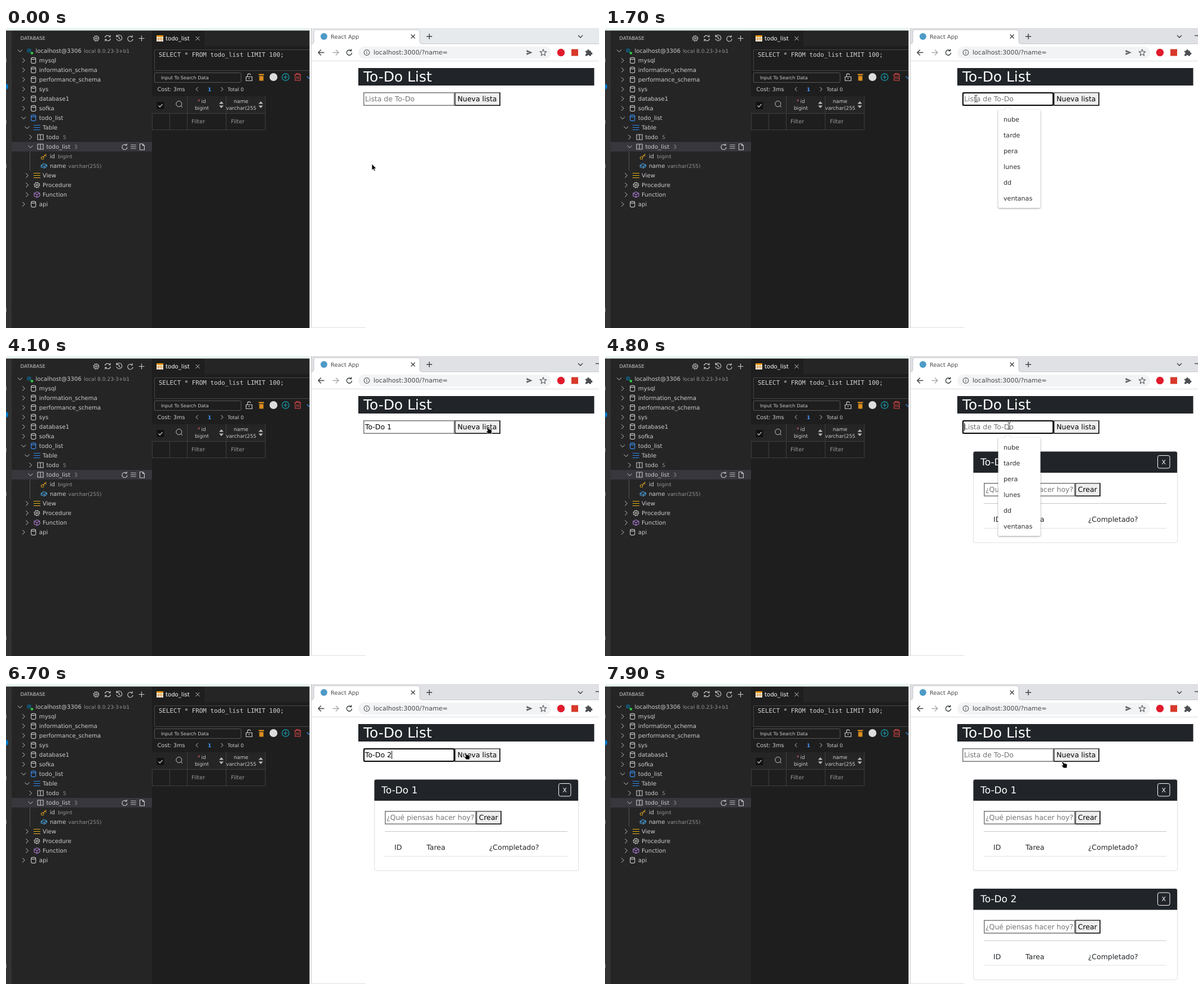
An HTML page that plays this animation: 1052x532 px, repeating every 8000 ms.

```html
<!DOCTYPE html>
<html lang="es">
<head>
<meta charset="utf-8">
<title>To-Do List</title>
<style>
html, body { margin: 0; width: 100%; height: 100%; overflow: hidden; }
svg { display: block; width: 100vw; height: 100vh; }
text { font: 10.15px "DejaVu Sans", sans-serif; white-space: pre; text-rendering: geometricPrecision; fill: #ccc; }
.mid { text-anchor: middle; }
.small { font-size: 8.8px; }
.desc { font-size: 9.1px; fill: #929292; }
.filter { font-size: 9.8px; fill: #999; }
.body { font-size: 12.45px; fill: #000; }
.hint { font-size: 12.45px; fill: #757575; }
.cell { font-size: 12.45px; fill: #212529; }
.heading { font-size: 24.9px; fill: #fff; }
.title { font-size: 17px; fill: #fff; }
.close { font-size: 10.9px; fill: #fff; }
.option { font-size: 11.1px; fill: #303030; }
.line { fill: none; stroke: #ccc; }
.dark { fill: none; stroke: #3c4043; stroke-width: 1.4; }
</style>
</head>
<body>
<svg viewBox="0 0 1052 532" preserveAspectRatio="none">
<defs>
  <path id="right" d="M-2-4L2 0-2 4"/>
  <path id="down" d="M-4-2L0 2 4-2"/>
  <path id="cylinder" d="M-4-3.5v7c0 2.2 8 2.2 8 0v-7c0-2.2-8-2.2-8 0c0 2.2 8 2.2 8 0"/>
  <path id="bars" d="M-6-4H6M-6 0H6M-6 4H6"/>
  <path id="columns" d="M-5-4.5H5v9H-5ZM0-4.5v9"/>
  <path id="cube" d="M0-5L5-2.5v5L0 5-5 2.5v-5ZM-5-2.5L0 0 5-2.5M0 0v5"/>
  <path id="box" d="M-1-4L5-2v3L1 4-5 2v-3ZM-5-1L1 1 5-2M1 1v3"/>
  <path id="key" d="M-1 1L4-4M-5 3a2.3 2.3 0 1 0 4.6 0a2.3 2.3 0 1 0-4.6 0M2-2l2 2"/>
  <g id="gear"><circle r="1.5"/><circle r="4"/><circle r="5" stroke-dasharray="1.6 2.327"/></g>
  <path id="reload" d="M3.2-3.2A4.6 4.6 0 1 0 4.6.4M.4-3h3.3v-3.1"/>
  <path id="cross" d="M-3.5-3.5l7 7M3.5-3.5l-7 7"/>
  <path id="plus" d="M-5 0H5M0-5V5"/>
  <path id="sorter" d="M-4-1.5L0-6 4-1.5ZM-4 1.5L0 6 4 1.5Z" fill="#bbb"/>

  <path id="arrow" d="M0 0V11.4L2.6 9 4.5 13 6.3 12.1 4.5 8.3H8Z" fill="#000" stroke="#fff" stroke-width=".8"/>
  <path id="stem" d="M-3-6.3Q0-6.3 0-4.8Q0-6.3 3-6.3M0-5V5M-3 6.3Q0 6.3 0 4.8Q0 6.3 3 6.3" fill="none"/>
  <g id="beam"><use href="#stem" stroke="#fff" stroke-width="2.4"/><use href="#stem" stroke="#333"/></g>
  <path id="hand" d="M-4.6-5.2Q-3.6-6.6-2.4-5.2L-.7-2.2Q.8-3 1.5-1.9Q3-2.4 3.5-1.2Q5-1.2 5 .6L4.4 6H-1.6L-4.8 2Q-5 .3-3.3 .9L-2.4 1.2Z" fill="#000" stroke="#fff" stroke-width=".8"/>

  <path id="field" d="M.8 23.2V.8H161.2V23.2Z" fill="#fff" stroke="#767676" stroke-width="1.5"/>
  <g id="card">
    <rect x="653.5" y="169.5" width="362" height="161.5" rx="3" fill="#fff" stroke="#dfdfdf"/>
    <path d="M653.5 207V172.5q0-3 3-3H1012q3 0 3 3V207Z" fill="#212529"/>
    <rect x="980.5" y="176.5" width="21.5" height="22.5" rx="3" fill="none" stroke="#fff"/>
    <text x="991.2" y="191.8" class="close mid">X</text>
    <use href="#field" x="672" y="225"/>
    <text x="675" y="241" class="hint">¿Qué piensas hacer hoy?</text>
    <path d="M834 225h45v24h-45Z" fill="#000"/>
    <path d="M834 249V225H879L877 227H836V247Z" fill="#555"/>
    <path d="M835.6 226.6h41.8v20.8h-41.8Z" fill="#efefef"/>
    <text x="839" y="241" class="body">Crear</text>
    <path d="M672 261.5H996" stroke="#c6c7c8"/>
    <path d="M672 305.5H996" stroke="#dee2e6"/>
    <text x="689" y="294" class="cell">ID</text>
    <text x="746" y="294" class="cell">Tarea</text>
    <text x="857" y="294" class="cell">¿Completado?</text>
  </g>
</defs>

<!-- Code editor -->
<rect width="1052" height="532" fill="#1e1e1e"/>
<rect width="10" height="532" fill="#333"/>
<rect x="10" width="249" height="532" fill="#252526"/>
<rect x="352" width="187" height="32" fill="#252526"/>
<rect width="539" height="4.5" fill="#e9f3f1"/>
<circle cx="-1.5" cy="104" r="5.5" fill="#007acc"/>
<path d="M.5 54v7M.5 163v7M.5 241v8M.5 496v8" stroke="#888"/>
<rect x="10" y="202" width="249" height="17" fill="#37373d"/>
<path d="M42.5 219V253" stroke="#555"/>
<text x="25.5" y="21" style="font-size:8.5px">DATABASE</text>
<g class="line" stroke-width="1.1">
  <use href="#gear" x="160" y="18.5"/>
  <path d="M175.5 17a5 5 0 0 1 9-1.5M185.5 19a5 5 0 0 1-9 1.5M185 12.5v3.2h-3.2M176 23.5v-3.2h3.2"/>
  <path d="M196.5 15a5 5 0 1 1-.5 4M196 12v3.5h3.5M200.5 15v3.5l2.5 1.5"/>
  <use href="#reload" x="220.5" y="19"/><use href="#plus" x="240.5" y="18.5"/>
  <use href="#reload" x="210.5" y="211"/><use href="#bars" transform="translate(226 210.5)scale(.8)"/>
  <path d="M237.5 205.5h5l3 3v7.5h-8ZM242.5 205.5v3h3"/>
</g>
<g id="tree"></g>

<rect x="267" y="13" width="12" height="11" rx="1" fill="#eee"/>
<path d="M267 13h12v3h-12Z" fill="#f39c12"/>
<path d="M267 19.5h12M271 16v8M275 16v8" stroke="#d68a20"/>
<text x="283" y="22" style="fill:#fff">todo_list</text>
<use href="#cross" x="340" y="18.5" class="line"/>
<path d="M539 38.5H263.5V75.5H539" class="line" style="stroke:#454545"/>
<text x="271" y="50.5" style="font:10.85px 'DejaVu Sans Mono',monospace;fill:#d4d4d4">SELECT * FROM todo_list LIMIT 100;</text>
<rect x="263.5" y="79.5" width="153.5" height="17" rx="1.5" class="line" style="stroke:#555"/>
<text x="275" y="90.7" style="font-size:8.15px">Input To Search Data</text>
<g fill="none" stroke-width="1.2">
  <path d="M426 86.5h10.5v7H426ZM428.5 86v-2a2.7 2.7 0 0 1 5.4-.5M431.2 88.5v2.5" stroke="#ccc"/>
  <path d="M448 81.5h10l-1.3 4v8h-7.4v-8Z" fill="#d98e1c"/>
  <path d="M448 84.5h10" stroke="#1e1e1e"/>
  <circle cx="474.5" cy="87" r="7" fill="#ddd"/>
  <g stroke="#16a5b8"><circle cx="496" cy="87" r="6.2"/><path d="M492.5 87h7M496 83.5v7"/></g>
  <path d="M511.5 82.5h12M515 82v-1.5h5V82M513 83v10h9V83M516 85.5v5M519 85.5v5" stroke="#e04848"/>
  <path d="M534 86l4 4" stroke="#3794ff"/>
</g>
<text x="268.5" y="112" style="font-size:9.8px">Cost: 3ms</text>
<path d="M340.5 105l-3.5 3.5 3.5 3.5M381.5 105l3.5 3.5-3.5 3.5" class="line"/>
<text x="361" y="112" class="mid small" style="fill:#409eff;font-weight:bold">1</text>
<text x="393" y="112" class="small">Total 0</text>
<rect x="259" y="121" width="201" height="31" fill="#252526"/>
<path d="M259 151.5H460M259 180.5H460M259.5 152V180M290.5 152V180M321.5 121V180M390.5 121V180M460 121V180" class="line" style="stroke:#3f3f3f"/>
<rect x="267.5" y="131" width="13" height="13" rx="2" fill="#111"/>
<path d="M270.5 137.5l2.5 2.7 4.5-5.2" class="line" stroke-width="1.2"/>
<path d="M301.8 134.500a5 5 0 1 0 10 0a5 5 0 1 0-10 0M310.5 138l2.500 2.800" class="line"/>
<text y="133" class="small"><tspan fill="#f56c6c" x="340">*</tspan><tspan x="346.5">id</tspan></text>
<text x="347.5" y="145" class="mid small">bigint</text>
<text x="417" y="133" class="mid" style="font-size:9.1px">name</text>
<text x="390.5" y="145" class="small">varchar(255</text>
<use href="#sorter" x="382" y="136"/><use href="#sorter" x="452" y="136"/>
<text x="329" y="169" class="filter">Filter</text>
<text x="399" y="169" class="filter">Filter</text>

<!-- Browser -->
<rect x="538.5" width="514" height="532" fill="#fff"/>
<rect id="strip" x="542" width="510" height="28"/>
<path d="M541.5 0V532" stroke="#c9c9c9"/>
<path d="M542 28q4 0 4-4V8q0-5 5-5H729q5 0 5 5V24q0 4 4 4Z" fill="#fff"/>
<path d="M542 28q4 0 4-4V8q0-5 5-5H729q5 0 5 5V24q0 4 4 4H1052" fill="none" stroke="#c3c4c6"/>
<circle cx="564" cy="15" r="6" fill="#4f9ac8"/>
<text x="576" y="18.8" style="font-size:9.9px;fill:#4a4d51">React App</text>
<g class="dark">
  <use href="#cross" x="722" y="15"/><use href="#plus" x="751" y="15"/><use href="#down" x="1019" y="15"/>
  <path id="minimise" d="M1046 13.5h6"/>
  <path d="M564.5 43.5H554.5M559 38.5l-5 5 5 5"/>
  <path d="M579.5 43.5H589.5M585 38.5l5 5-5 5" stroke="#aaa"/>
  <use href="#reload" x="609" y="43.5"/>
</g>
<rect x="625" y="33" width="342" height="21.5" rx="10.75" fill="#f1f3f4"/>
<g fill="none" stroke="#5f6368" stroke-width="1.2">
  <circle cx="640" cy="43.5" r="4.8"/><path d="M640 42.8v3.2M640 40.5v1.2"/>
  <path d="M923.5 39l10.5 4.5-10.5 4.5v-3.5l6-1-6-1Z" fill="#5f6368" stroke="none"/>
  <path d="M953 38l1.6 3.7 4 .3-3 2.7.9 4-3.5-2.1-3.5 2.1.9-4-3-2.7 4-.3Z"/>
</g>
<text x="652" y="47.3" style="font-size:11.05px;fill:#45484c">localhost:3000/?name=</text>
<circle cx="984.5" cy="43.5" r="6.7" fill="#e01b2b"/>
<rect x="1003" y="37.5" width="12" height="12" fill="#d6392b"/>
<path d="M1028 40.5h3.2a1.9 1.9 0 1 1 3.6 0h3.2v3a1.9 1.9 0 1 1 0 3.6v2.4h-3.3a1.7 1.7 0 0 0-3.4 0H1028v-3a1.7 1.7 0 0 0 0-3.4Z" fill="#4a4d51"/>
<path d="M542 58.5H1052" stroke="#dadce0"/>
<path d="M542 531.5H638" stroke="#dedede"/>

<!-- Page -->
<path d="M625 71H1043.5V102H625Z" fill="#212529"/>
<text x="634" y="95" class="heading">To-Do List</text>
<use href="#field" x="634" y="114"/>
<rect id="focus" x="635" y="115" width="160" height="22" rx="2.5" fill="#fff" stroke="#000" stroke-width="2"/>
<text id="hint" x="637" y="130" class="hint">Lista de To-Do</text>
<text id="value" x="637" y="130" class="body"></text>
<path id="caret" d="M.5 118.5V133" stroke="#000"/>
<path d="M796 114h81v24h-81Z" fill="#000"/>
<path d="M796 138V114H877L875 116H798V136Z" fill="#555"/>
<path d="M797.6 115.6h77.8v20.8h-77.8Z" fill="#efefef"/>
<text x="801" y="130" class="body">Nueva lista</text>
<g id="first"><use href="#card"/><text x="666.2" y="193.7" class="title">To-Do 1</text></g>
<g id="second" transform="translate(0 193.5)"><use href="#card"/><text x="666.2" y="193.7" class="title">To-Do 2</text></g>
<g id="options" style="filter:drop-shadow(0 1px 1.5px #0006)">
  <path d="M700 145H709L714.5 139.5 720 145H770q2.5 0 2.5 2.5V316.5q0 2.5-2.5 2.5H700q-2.5 0-2.5-2.5V147.5q0-2.5 2.5-2.5Z" fill="#fff"/>
</g>
<use id="cursor"/>
</svg>
<script>
const el = id => document.getElementById(id);

// depth, open state (-1 = leaf), icon, colour, label, detail, detail x
const rows = [
  [0, 1, '', '', 'localhost@3306', 'local 8.0.23-3+b1', 138],
  [1, 0, 'cylinder', '#ccc', 'mysql'],
  [1, 0, 'cylinder', '#ccc', 'information_schema'],
  [1, 0, 'cylinder', '#ccc', 'performance_schema'],
  [1, 0, 'cylinder', '#ccc', 'sys'],
  [1, 0, 'cylinder', '#ccc', 'database1'],
  [1, 0, 'cylinder', '#ccc', 'sofka'],
  [1, 1, 'cylinder', '#3794ff', 'todo_list'],
  [2, 1, 'bars', '#2f86e0', 'Table'],
  [3, 0, 'columns', '#ccc', 'todo', '5', 101],
  [3, 1, 'columns', '#ccc', 'todo_list', '3', 121],
  [4, -1, 'key', '#d9a520', 'id', 'bigint', 92],
  [4, -1, 'box', '#4aa3df', 'name', 'varchar(255)', 110.5],
  [2, 0, 'bars', '#e0ae10', 'View'],
  [2, 0, 'gear', '#ccc', 'Procedure'],
  [2, 0, 'cube', '#b180d7', 'Function'],
  [1, 0, 'cylinder', '#ccc', 'api']
];
el('tree').innerHTML = rows.map(([depth, open, icon, colour, label, detail, detailX], i) => {
  const x = 25 + depth * 6.2, y = 40.5 + i * 17;
  const chevron = open < 0 ? '' : `<use href="#${open ? 'down' : 'right'}" x="${x}" y="${y}" class="line"/>`;
  const mark = icon
    ? `<use href="#${icon}" x="${x + 17.5}" y="${y}" fill="none" stroke="${colour}" stroke-width="1.1"/>`
    : `<circle cx="41" cy="40" r="4" fill="#164f66"/><circle cx="46" cy="44.5" r="2.3" fill="#2ecc40"/>`;
  return chevron + mark + `<text x="${52.5 + depth * 6.3}" y="${y + 3.3}">${label}</text>` +
    (detail ? `<text x="${detailX}" y="${y + 3.3}" class="desc">${detail}</text>` : '');
}).join('');

el('options').innerHTML += ['nube', 'tarde', 'pera', 'lunes', 'dd', 'ventanas']
  .map((word, i) => `<text x="707" y="${166 + i * 27.9}" class="option">${word}</text>`).join('');

// start time, shape, x, y
const pointer = [
  [0, 'arrow', 649, 241], [400, 'arrow', 650, 226], [500, 'arrow', 653, 192],
  [600, 'arrow', 656, 158], [700, 'beam', 658, 132], [800, 'beam', 658, 125],
  [3300, 'beam', 805, 111], [3400, 'arrow', 868, 112], [3500, 'arrow', 912, 118],
  [3600, 'arrow', 925, 126], [3700, 'arrow', 890, 128], [3800, 'hand', 857, 132],
  [4200, 'hand', 838, 130], [4300, 'beam', 785, 126], [4400, 'beam', 738, 124],
  [4500, 'beam', 717, 124], [6300, 'beam', 745, 124], [6400, 'beam', 784, 124],
  [6600, 'hand', 807, 126], [6700, 'hand', 818, 128], [6800, 'hand', 826, 128],
  [6900, 'hand', 828.5, 128], [7800, 'hand', 821, 137], [7900, 'hand', 815, 143]
];
const typing = [
  [0, ''], [2200, 'T'], [2300, 'To-'], [2400, 'To-Do'], [2900, 'To-Do '], [3000, 'To-Do 1'], [4200, ''],
  [5400, 'T'], [5500, 'To'], [5600, 'To-'], [5700, 'To-Do'], [5900, 'To-Do '], [6200, 'To-Do 2'], [7200, '']
];
const during = (t, ...spans) => spans.some(([from, to]) => t >= from && t < to);
const latest = (track, t) => track.findLast(key => key[0] <= t);
const show = (id, on) => el(id).style.display = on ? '' : 'none';

function draw() {
  const t = performance.now() % 8000;
  const value = latest(typing, t)[1];
  const [, shape, x, y] = latest(pointer, t);
  const active = t >= 1100;

  el('strip').setAttribute('fill', active ? '#dfe1e5' : '#e7eaed');
  show('minimise', active);
  show('focus', during(t, [900, 4000], [4700, 7100]));
  show('hint', !value);
  show('options', during(t, [1100, 2200], [4800, 5400]));
  show('first', t >= 4200);
  show('second', t >= 7200);
  show('caret', during(t, [1100, 1700], [2200, 3500], [4700, 6800]));
  el('value').textContent = value;
  const width = value ? el('value').getComputedTextLength() : 0;
  el('caret').setAttribute('transform', `translate(${Math.round(637 + width)})`);
  el('cursor').setAttribute('href', '#' + shape);
  el('cursor').setAttribute('transform', `translate(${x} ${y})`);
  requestAnimationFrame(draw);
}
draw();
</script>
</body>
</html>
```
